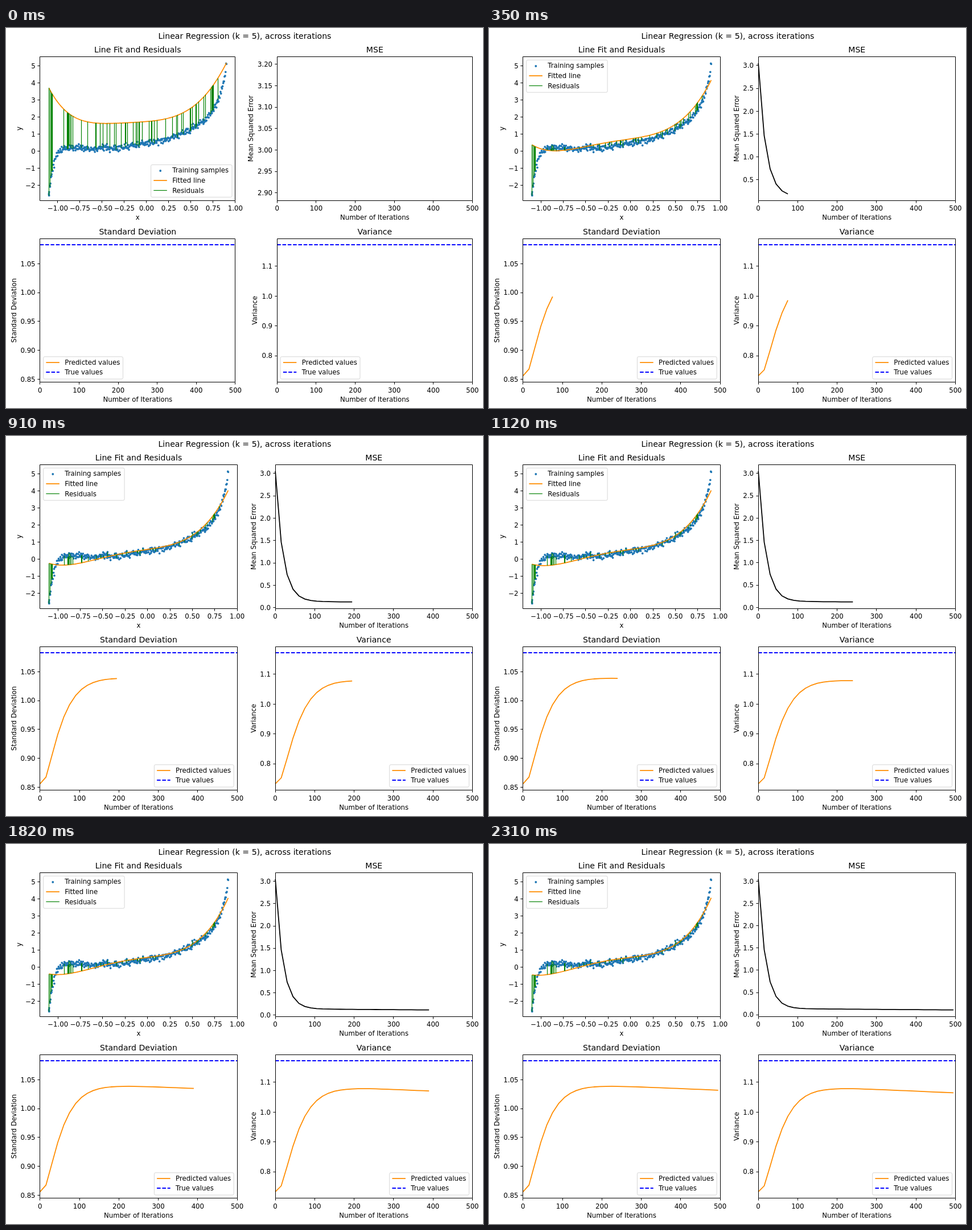
An HTML page for the animation above (2380 ms loop, 838 by 668 pixels).

```html
<!DOCTYPE html>
<html lang="en">
<head>
<meta charset="utf-8">
<title>Linear Regression</title>
<style>
html, body { margin: 0; width: 100%; height: 100%; overflow: hidden; background: #fff; }
svg { display: block; width: 838px; height: 668px; font: 11.74px "DejaVu Sans", sans-serif; }
.title { font-size: 14.08px; }
.mid { text-anchor: middle; }
.end { text-anchor: end; }
path { fill: none; stroke-width: 1.76; stroke-linejoin: round; }
.axis { stroke: #000; stroke-width: 1; stroke-linejoin: miter; }
.dots { stroke: #1f77b4; stroke-width: 3.8; stroke-linecap: round; }
.fit { stroke: #ff8c00; }
.res { stroke: #008000; stroke-width: 1.17; }
.mse { stroke: #000; }
.real { stroke: #00f; stroke-dasharray: 6.5 2.8; }
.box { fill: #fff; fill-opacity: .8; stroke: #ccc; stroke-opacity: .8; }
</style>
</head>
<body>
<svg id="stage" viewBox="0 0 838 668"></svg>
<script>
const STEP_MS = 70, STEPS = 34, ITERS = 15, FS = 11.74;
const ROWS = [[50.4, 303.2], [370.1, 622.9]];
const X_MIN = -1.1, X_MAX = .9;
const stage = document.getElementById('stage');

// Training error shrinks by a fixed ratio each step, on top of a slow drift
const decay = k => .672 ** k;
const mse = k => .14 - .001 * k + 2.91 * .455 ** k;
const std = k => {
  const r = decay(k);
  return 1.046 - .00043 * k - r * (.395 - r * (.17 + r * .035));
};
const variance = k => std(k) ** 2;
const REAL_STD = 1.0822;

// Quintic through six nodes
const NODES = [-1.1, -.9, -.4, .2, .7, .9];
const START = [3.72, 2.32, 1.64, 1.89, 3.53, 5.19];
const SETTLED = [-.07, -.29, .17, .78, 2.4, 4];
const DRIFT = [-.67, -.2, .12, -.06, -.18, .14];

function fitAt(k) {
  const slow = 1 - Math.exp(-k / 40);
  const values = START.map((start, i) => {
    const goal = SETTLED[i] + DRIFT[i] * slow;
    return goal + (start - goal) * decay(k);
  });
  return x => values.reduce((sum, v, i) => sum + NODES.reduce(
    (p, n, j) => i === j ? p : p * (x - n) / (NODES[i] - n), v), 0);
}

// Samples: a smooth trend, steep at both ends, plus seeded noise
const trend = x => .47 + x * (.95 + x * (.9 + x * (.7 + x * .7))) +
  2.1 * Math.exp((x - X_MAX) / .065) - 3.1 * Math.exp((X_MIN - x) / .06);
let seed = 11;
const random = () => (seed = seed * 16807 % 2147483647) / 2147483647;
const noise = () => (random() + random() + random() + random() - 2) * .17;
const sample = t => {
  const x = X_MIN + (X_MAX - X_MIN) * t;
  return [x, trend(x) + noise()];
};
const ends = [X_MIN, X_MAX].map(x => [x, trend(x)]);
const residuals = [ends[0], ...Array.from({ length: 62 }, () => sample(random()))];
const samples = [...residuals, ends[1],
  ...Array.from({ length: 340 }, (_, i) => sample((i + random()) / 340))];

// Markup helpers
const px = v => v.toFixed(2);
const snap = v => Math.floor(v) + .5;
const path = (cls, d) => `<path class="${cls}" d="${d}"/>`;
const text = (x, y, str, cls = '') =>
  `<text x="${px(x)}" y="${Math.round(y)}" class="${cls}">${str}</text>`;
const vertical = (x, y, str) =>
  `<text class="mid" transform="translate(${Math.round(x)} ${px(y)}) rotate(-90)">${str}</text>`;
const polyline = pts => 'M' + pts.map(([x, y]) => px(x) + ' ' + px(y)).join('L');
const label = (v, digits) => v.toFixed(digits).replace('-', '\u2212');

function ticks(lo, hi, step) {
  const out = [];
  for (let i = Math.ceil(lo / step - 1e-6); i * step <= hi + 1e-6; i++) out.push(i * step);
  return out;
}

function makeAxes(span, row, xLim, yLim) {
  const [left, right] = span, [top, bottom] = ROWS[row];
  return {
    left, right, top, bottom, xLim, yLim,
    x: v => left + (right - left) * (v - xLim[0]) / (xLim[1] - xLim[0]),
    y: v => bottom - (bottom - top) * (v - yLim[0]) / (yLim[1] - yLim[0])
  };
}

function frame(a, o) {
  const cx = (a.left + a.right) / 2, cy = (a.top + a.bottom) / 2;
  const [l, r, t, b] = [a.left, a.right, a.top, a.bottom].map(snap);
  let d = `M${l} ${t}H${r}V${b}H${l}Z`, out = '';
  for (const v of ticks(...a.xLim, o.xStep)) {
    d += `M${snap(a.x(v))} ${b}v4.1`;
    out += text(a.x(v), a.bottom + 17.8, label(v, o.xDigits), 'mid');
  }
  for (const v of ticks(...a.yLim, o.yStep)) {
    d += `M${l} ${snap(a.y(v))}h-4.1`;
    out += text(a.left - 8.2, a.y(v) + 4.2, label(v, o.yDigits), 'end');
  }
  return path('axis', d) + out + text(cx, a.top - 7.1, o.title, 'title mid') +
    text(cx, a.bottom + 33.8, o.xLabel, 'mid') + vertical(o.yLabelX, cy, o.yLabel);
}

function legend(a, corner, width, rows) {
  const pad = FS / 2, h = rows.length * 17.7 + 3.8;
  const x = corner.includes('right') ? a.right - pad - width : a.left + pad;
  const y = corner.includes('lower') ? a.bottom - pad - h : a.top + pad;
  let out = `<rect class="box" x="${px(x)}" y="${px(y)}" width="${width}" height="${px(h)}" rx="2.3"/>`;
  rows.forEach(([cls, str], i) => {
    const cy = Math.round(y + 9.9 + i * 17.7);
    out += cls === 'dots'
      ? path(cls, `M${px(x + 16.6)} ${cy + 1}h0`)
      : path(cls, `M${px(x + 4.7)} ${cls === 'res' ? cy - .5 : cy}h23.5`);
    out += text(x + 37.6, cy + 4, str);
  });
  return out;
}

function fitPlot(k, span) {
  const a = makeAxes(span, 0, [-1.2, 1], [-2.884, 5.554]), f = fitAt(k);
  const curve = Array.from({ length: 101 }, (_, i) => X_MIN + i * .02).map(x => [a.x(x), a.y(f(x))]);
  const dots = samples.map(([x, y]) => `M${px(a.x(x))} ${px(a.y(y))}h0`).join('');
  const bars = residuals.map(([x, y]) => `M${snap(a.x(x))} ${px(a.y(y))}V${px(a.y(f(x)))}`).join('');
  return path('dots', dots) + path('fit', polyline(curve)) + path('res', bars) +
    frame(a, { xStep: .25, xDigits: 2, yStep: 1, yDigits: 0, title: 'Line Fit and Residuals',
      xLabel: 'x', yLabel: 'y', yLabelX: 27 }) +
    legend(a, k ? 'upper left' : 'lower right', 142.4,
      [['dots', 'Training samples'], ['fit', 'Fitted line'], ['res', 'Residuals']]);
}

const history = (a, k, value) => polyline(Array.from({ length: k + 1 },
  (_, i) => [a.x(i * ITERS), a.y(value(i))]));

function msePlot(k, span) {
  const hi = mse(0), lo = mse(k), margin = k ? (hi - lo) * .05 : hi * .055;
  const a = makeAxes(span, 0, [0, 500], [lo - margin, hi + margin]);
  const yStep = [.05, .2, .5].find(s => a.yLim[1] - a.yLim[0] < 9 * s);
  return path('mse', history(a, k, mse)) +
    frame(a, { xStep: 100, xDigits: 0, yStep, yDigits: k ? 1 : 2,
      title: 'MSE', xLabel: 'Number of Iterations',
      yLabel: 'Mean Squared Error', yLabelX: k ? 439 : 434 });
}

function spreadPlot(k, span, value, real, o) {
  const margin = (real - value(0)) * .05;
  const a = makeAxes(span, 1, [0, 500], [value(0) - margin, real + margin]);
  return path('fit', history(a, k, value)) +
    path('real', `M${a.left} ${Math.floor(a.y(real))}H${a.right}`) +
    frame(a, { xStep: 100, xDigits: 0, xLabel: 'Number of Iterations', yLabel: o.title, ...o }) +
    legend(a, k ? 'lower right' : 'lower left', 139.8,
      [['fit', 'Predicted values'], ['real', 'True values']]);
}

function render(k) {
  const width = k ? 346.3 : 343.1;
  const left = [59.8, 59.8 + width], right = [819.4 - width, 819.4];
  return text(419.5, 19, 'Linear Regression (k = 5), across iterations', 'title mid') +
    fitPlot(k, left) + msePlot(k, right) +
    spreadPlot(k, left, std, REAL_STD,
      { title: 'Standard Deviation', yStep: .05, yDigits: 2, yLabelX: 18 }) +
    spreadPlot(k, right, variance, REAL_STD ** 2,
      { title: 'Variance', yStep: .1, yDigits: 1, yLabelX: k ? 439 : 441 });
}

let shown = -1;
function tick() {
  const k = Math.floor(performance.now() / STEP_MS) % STEPS;
  if (k !== shown) stage.innerHTML = render(shown = k);
  requestAnimationFrame(tick);
}
tick();
</script>
</body>
</html>
```
